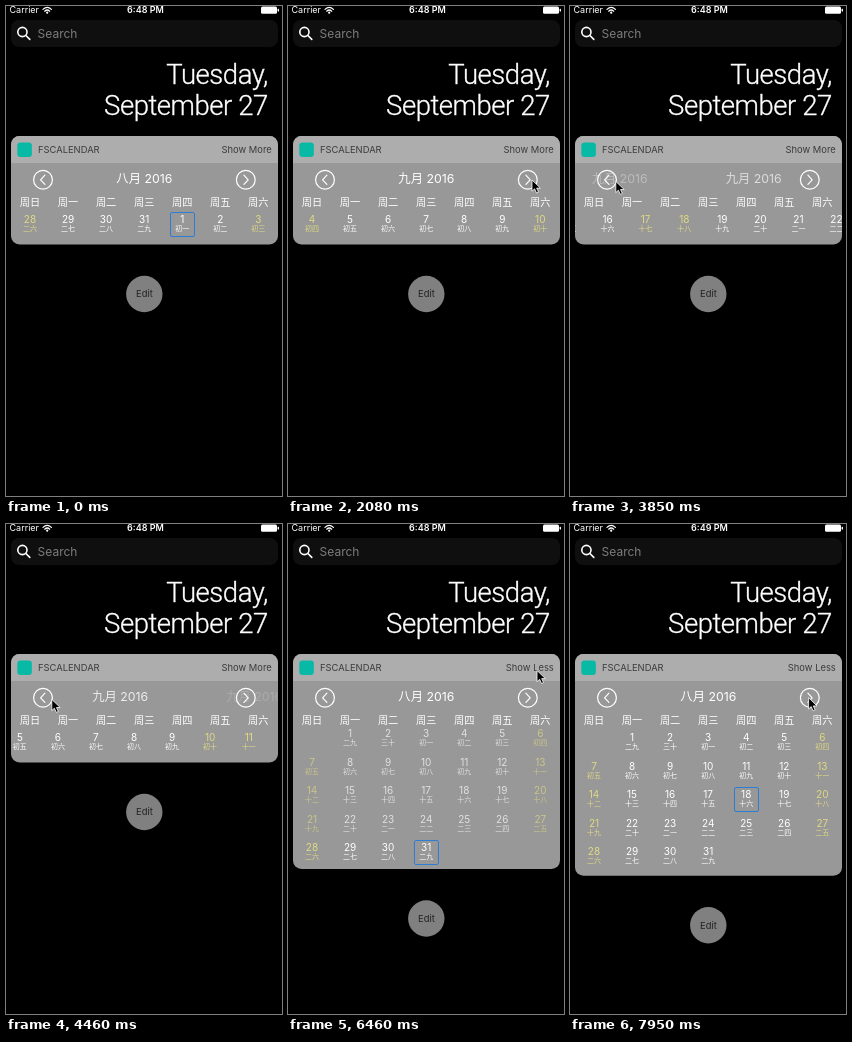
Animation of 276x490 px, one loop 8000 ms. Source, as an HTML page:

```html
<!DOCTYPE html>
<html lang="zh-CN">
<head>
<meta charset="utf-8">
<title>Calendar widget</title>
<style>
  html, body { margin: 0; width: 100%; height: 100%; overflow: hidden; background: #000; }
  svg { display: block; width: 100%; height: 100%; }
  text { font-family: Inter, "Noto Sans CJK SC", "Noto Sans CJK", sans-serif; fill: #fff; }
  .mid { text-anchor: middle; }
  .end { text-anchor: end; }
  .status { font-size: 9px; }
  .date { font: 300 27.5px Roboto, Inter, sans-serif; letter-spacing: -.45px; stroke: #fff; stroke-width: .35; }
  .label { font-size: 9.4px; fill: #3c3c3c; }
  .title { font-size: 12.3px; }
  .week { font-size: 10.2px; }
  .day { font-size: 10px; }
  .lunar { font-size: 7px; }
  .off { fill: #e0d982; }
  .sel { fill: none; stroke: #2f7cd3; stroke-width: 1; }
  .line { fill: none; stroke: #fff; stroke-width: 1.2; stroke-linecap: round; stroke-linejoin: round; }
</style>
</head>
<body>
<svg viewBox="0 0 276 490" preserveAspectRatio="none">
  <defs>
    <clipPath id="panelClip"><rect id="panelShape" x="5" y="130" width="267" height="108.5" rx="8.5"/></clipPath>
    <clipPath id="daysClip"><rect id="daysShape" x="5" y="203" width="267" height="35.5"/></clipPath>
  </defs>
  <rect width="276" height="490"/>

  <text class="status" x="3.5" y="7.2">Carrier</text>
  <g class="line">
    <path d="M37 3.4Q41.2 -.6 45.4 3.4M38.7 5.2Q41.2 2.8 43.7 5.2"/>
    <circle cx="41.2" cy="6.7" r=".5"/>
  </g>
  <text class="status mid" id="clock" x="139.5" y="7.2" font-weight="600">6:48 PM</text>
  <rect x="255" y=".6" width="16" height="7.2" rx="1.5" fill="#fff"/>
  <rect x="271.6" y="2.8" width="1.4" height="2.8" rx=".6" fill="#fff"/>

  <rect x="5" y="14" width="267" height="27" rx="8" fill="#0f0f0f"/>
  <g class="line" style="stroke-width:1.6"><circle cx="16.4" cy="26" r="4.6"/><path d="M19.9 29.5L23.8 33.4"/></g>
  <text x="31.6" y="32" font-size="12" style="fill:#7d7d7d">Search</text>

  <text class="date end" x="261.8" y="78">Tuesday,</text>
  <text class="date end" x="261.8" y="109">September 27</text>

  <g clip-path="url(#panelClip)">
    <rect x="5" y="130" width="267" height="230" fill="#989898"/>
    <rect x="5" y="130" width="267" height="27" fill="#adadad"/>
    <rect x="11.3" y="136.4" width="14.6" height="14.6" rx="3.3" fill="#08b9a6"/>
    <text class="label" x="32" y="147.2">FSCALENDAR</text>
    <text class="label end" id="toggle" x="265.8" y="147">Show More</text>
    <g id="titles"></g>
    <g class="line">
      <circle cx="37" cy="173.8" r="9.4"/><path d="M38.9 169.2L34.6 173.8L38.9 178.4"/>
      <circle cx="239.8" cy="173.8" r="9.4"/><path d="M237.9 169.2L242.2 173.8L237.9 178.4"/>
    </g>
    <g id="names"></g>
    <g clip-path="url(#daysClip)">
      <g id="weeks"></g>
      <g id="month"></g>
    </g>
  </g>

  <g id="edit">
    <circle cx="138.3" r="18.2" fill="#808080"/>
    <text class="label mid" x="138.4" y="3.4" style="fill:#222">Edit</text>
  </g>

  <path id="cursor" d="M0 0V11.2L2.6 8.8L4.5 13L6.5 12.1L4.7 8.1H8.4Z" fill="#000" stroke="#fff" stroke-width=".8"/>
</svg>
<script>
const LOOP = 8000, PAGE = 267, PITCH = 28.5;
const SHUT = 238.5, OPEN = 351.7;
const EXPAND = 6140, GROW = 6460, PICK_31 = 780, PICK_18 = 7450;
const $ = id => document.getElementById(id);
const colX = c => 24 + 38.05 * c;
const digits = "一二三四五六七八九";

function lunar(n) {
  if (n % 10 === 0) return ["初十", "二十", "三十"][n / 10 - 1];
  return "初十二"[Math.floor(n / 10)] + digits[n % 10 - 1];
}

// n counts days from August 1
function cell(n, col, row) {
  const day = n > 31 ? n - 31 : n;
  const moon = n > 31 ? day : n > 2 ? n - 2 : n + 28;
  const off = col % 6 ? "" : " off", x = colX(col), y = 214 + row * PITCH;
  return `<text class="day mid${off}" x="${x}" y="${y + 3.3}">${day}</text>` +
    `<text class="lunar mid${off}" x="${x}" y="${y + 11}">${lunar(moon)}</text>`;
}

const box = id => `<rect class="sel" id="${id}" x="-12" y="-12" width="24" height="24" rx="1.5"/>`;

let weeks = box("weekSel"), titles = "", names = "", early = "", last = "";
for (let w = 0; w < 4; w++) {
  let days = "";
  for (let c = 0; c < 7; c++) days += cell(28 + w * 7 + c, c, 0);
  weeks += `<g transform="translate(${w * PAGE})">${days}</g>`;
  titles += `<text class="title mid" y="177">${w ? "九" : "八"}月 2016</text>`;
}
for (let n = 1; n < 28; n++) early += cell(n, n % 7, Math.floor(n / 7));
for (let n = 28; n <= 31; n++) last += cell(n, n % 7, 4);
[..."日一二三四五六"].forEach((d, c) => {
  names += `<text class="week mid" x="${colX(c)}" y="199.6">周${d}</text>`;
});
$("weeks").innerHTML = weeks;
$("month").innerHTML = `${box("monthSel")}<g id="early">${early}</g>${last}`;
$("titles").innerHTML = titles;
$("names").innerHTML = names;

// rows of [time, ...values], eased between rows
const scroll = [[0, 0]];
[[1725, 1], [2245, 2], [2853, 3], [3730, 2], [4235, 1], [4780, 0]].forEach(([at, page]) => {
  scroll.push([at, scroll[scroll.length - 1][1]], [at + 310, page]);
});
const pointer = [
  [390, 256, 262], [760, 138, 217], [860, 138, 217], [1195, 196, 198], [1530, 244, 174],
  [3180, 244, 174], [3470, 45.8, 175.4], [5160, 45.8, 175.4], [5270, 243.5, 195],
  [5430, 243.5, 195], [5810, 249, 146.5], [6540, 249, 146.5], [7090, 180, 273],
  [7560, 180, 273], [7800, 248.5, 165], [7950, 238.6, 173.8]
];
const settle = [[GROW, 1], [GROW + 130, 0]];

function track(rows, t) {
  const i = rows.findIndex(r => r[0] > t);
  if (i === 0) return rows[0].slice(1);
  if (i < 0) return rows[rows.length - 1].slice(1);
  const a = rows[i - 1], b = rows[i];
  const u = (t - a[0]) / (b[0] - a[0]), e = u * u * (3 - 2 * u);
  return a.slice(1).map((v, k) => v + (b[k + 1] - v) * e);
}

function bounce(dt) {
  if (dt < 0 || dt >= 150) return 1;
  return dt < 112 ? .3 + .9 * dt / 112 : 1.2 - .2 * (dt - 112) / 38;
}

const move = (el, x, y, s = 1) => el.setAttribute("transform", `translate(${x} ${y}) scale(${s})`);
const show = (el, on) => el.setAttribute("visibility", on ? "visible" : "hidden");
function write(el, s) { if (el.textContent !== s) el.textContent = s; }

function draw(t) {
  const [page] = track(scroll, t);
  const full = t >= EXPAND, grown = t >= GROW, [rest] = track(settle, t);
  const bottom = grown ? OPEN - 6.7 * rest : SHUT;

  [...$("titles").children].forEach((el, i) => {
    el.setAttribute("x", 138.3 + 134 * (i - page));
    el.setAttribute("opacity", Math.max(0, 1 - Math.abs(i - page)));
  });
  move($("weeks"), -page * PAGE, 0);
  show($("weeks"), !full);
  show($("month"), full);
  move($("month"), 0, grown ? -4 * rest : -4 * PITCH);
  $("early").setAttribute("opacity", 1 - .3 * rest);
  move($("weekSel"), colX(t < PICK_31 ? 4 : 3) + .3, 218.5, bounce(t - PICK_31));
  const late = t >= PICK_18;
  move($("monthSel"), colX(late ? 4 : 3) + .3, 218.5 + PITCH * (late ? 2 : 4), bounce(t - PICK_18));

  $("panelShape").setAttribute("height", bottom - 130);
  $("daysShape").setAttribute("height", bottom - 203);
  move($("edit"), 0, bottom + 49.5);
  write($("toggle"), full ? "Show Less" : "Show More");
  write($("clock"), t < 6700 ? "6:48 PM" : "6:49 PM");

  const [x, y] = track(pointer, t);
  show($("cursor"), t >= 390);
  move($("cursor"), x, y);
}

const start = performance.now();
function frame() {
  draw((performance.now() - start) % LOOP);
  requestAnimationFrame(frame);
}
frame();
</script>
</body>
</html>
```
